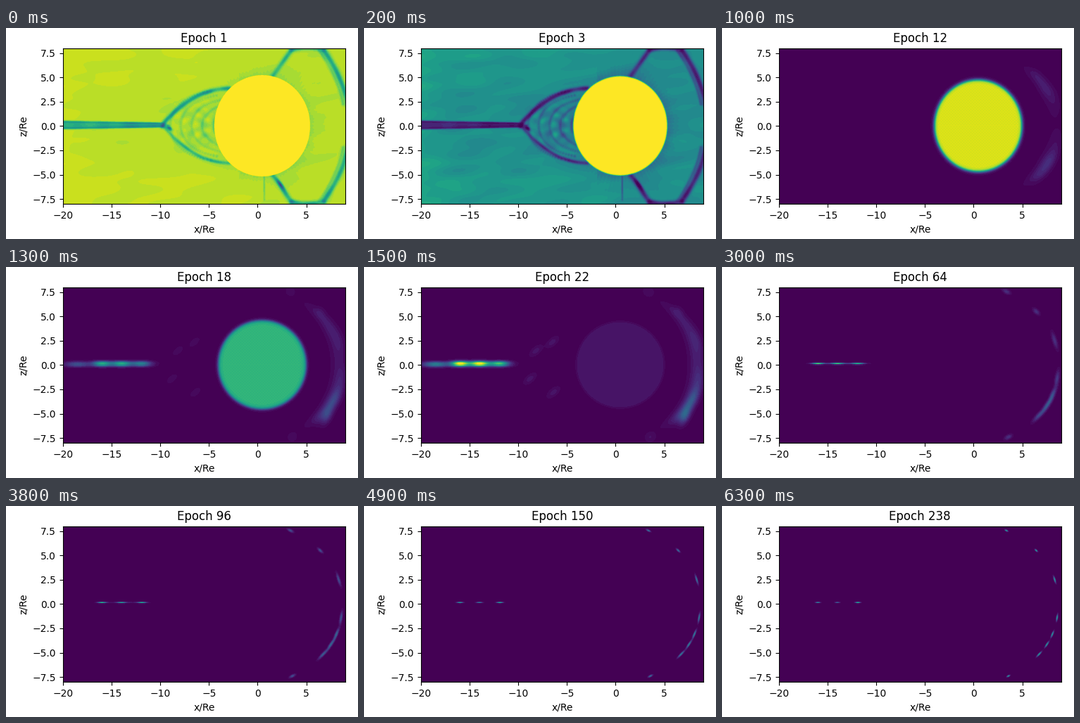
A matplotlib script that plays this animation: 500x300 px, repeating every 6.4 s.

```python
import numpy as np
import matplotlib.pyplot as plt
from matplotlib.animation import FuncAnimation

FRAMES, INTERVAL = 64, 100
WIDTH, HEIGHT, DPI = 500, 300, 100
BANDS = 38  # steps of the filled colour scale
NX, NY = 401, 221

X, Y = np.meshgrid(-20 + (np.arange(NX) + 0.5) * 29 / NX,
                   -8 + (np.arange(NY) + 0.5) * 16 / NY)
rng = np.random.default_rng(4)

# Tail hot spots: x, height when they appear, height at the end
HOT_SPOTS = [(-16, 0.98, 0.55), (-14, 0.8, 0.38), (-11.9, 0.62, 0.8)]
# Heights on the curved front where samples gather
FRONT_Y = [7.5, 5.45, 2.45, -1.4, -3.1, -4.15, -5.15, -7.4]
WISPS = [(-6.5, 2.3), (-8.2, 1.4), (-8.8, -1.4), (-6.4, -2.8)]


def ramp(i, start, end):
    """Linear 0 to 1 between two frames, held outside them."""
    return np.clip((i - start) / (end - start), 0, 1)


def mix(a, b, t):
    return a + (b - a) * t


def decay(i, span):
    """Exponential shrink, 1 at frame 23."""
    return np.exp(-(i - 23) / span)


def waves(count, fx, fy):
    """Smooth random texture of roughly unit size."""
    total = np.zeros_like(X)
    for a, b, phase in rng.uniform(-1, 1, (count, 3)):
        total += np.sin(a * fx * X + b * fy * Y + np.pi * phase)
    return total * np.sqrt(2 / count)


def stroke(xs, ys, width):
    """Soft line through closely spaced points, with uneven strength."""
    nearest = np.full_like(X, 1e9)
    for x, y in zip(xs, ys):
        nearest = np.minimum(nearest, (X - x) ** 2 + (Y - y) ** 2)
    return np.exp(-nearest / width ** 2) * (1 + 0.15 * waves(8, 4, 3))


def spot(x, y, angle, length, width):
    c, s = np.cos(angle), np.sin(angle)
    along = ((X - x) * c + (Y - y) * s) / length
    across = ((Y - y) * c - (X - x) * s) / width
    return np.exp(-0.5 * (along ** 2 + across ** 2))


def disc(rx, ry, soft):
    r = np.hypot((X - 0.39) / rx, Y / ry)
    return 1 / (1 + np.exp(np.clip((r - 1) / soft, -50, 50)))


def front(y):
    return 8.6 - 0.055 * y ** 2 - 0.0007 * y ** 4


def front_angle(y):
    return np.arctan2(1, -0.11 * y - 0.0028 * y ** 3)


def background():
    """Quiet plasma: light towards the left and the outer edges."""
    left = 1 / (1 + np.exp(X))
    outer = np.clip((np.abs(Y) - 3) / 3, 0, 1)
    return (0.892 + 0.025 * np.exp(-(X + 20) / 2) + 0.014 * left * outer
            + 0.007 * waves(20, 1.2, 5))


def halo():
    """Faint rays around the planet."""
    r = np.hypot((X - 0.39) / 4.92, Y / 5.18)
    theta = np.arctan2(Y, X - 0.39)
    rays = 0.8 + 0.2 * np.sin(37 * theta) * np.sin(61 * theta + 3 * r)
    side = np.where(X > -2, 1, 0.5)
    return 0.075 * side * rays * np.exp(-np.maximum(r - 1, 0) / 0.13)


def sheet():
    """Current sheet: a broad band with two darker edges."""
    half = mix(0.3, 0.12, np.clip((X + 20) / 10, 0, 1))
    y = Y - 0.08
    band = 0.26 * np.exp(-(y / (half + 0.1)) ** 4)
    edges = sum(np.exp(-((y - s * half) / 0.1) ** 2) for s in (-1, 1))
    end = 1 / (1 + np.exp((X + 9.8) * 6))
    return (band + 0.14 * edges) * end * (1 + 0.1 * waves(10, 3, 2))


def lobe():
    """Nested field lines between the sheet and the planet."""
    t = np.linspace(0, 1, 70)
    rise = np.sin(np.pi / 2 * t ** 0.85)
    dark = 0.36 * stroke(-9.8 + 6.8 * t, 3.8 * rise, 0.22)
    dark += 0.22 * stroke(-9.6 + 6.6 * t, -3.8 * rise, 0.18)
    angle = np.linspace(-1.2, 1.2, 50)
    for reach in np.linspace(4.6, 9, 5):
        dark += 0.07 * stroke(-reach * np.cos(angle) ** 0.6,
                              0.42 * reach * np.sin(angle), 0.16)
    inside = np.exp(-((X + 6.5) / 2) ** 4 - (Y / 2.2) ** 4)
    dark += 0.025 * inside * (1 + waves(14, 6, 7))
    return dark + 0.5 * spot(-9.1, -0.2, -0.7, 0.22, 0.12)


def shock():
    """Cusps and outer boundary, mirrored above and below the planet."""
    t = np.linspace(0, 1, 60)
    dark = np.zeros_like(X)
    for sign in (-1, 1):
        y = mix(2.2, 7.7, t)
        dark += 0.28 * stroke(9.4 - 0.045 * y ** 2, sign * y, 0.27)
        dark += 0.1 * stroke(8.9 - 0.045 * y ** 2, sign * y, 0.15)
        dark += 0.25 * stroke(mix(1.5, 3.4, t), sign * mix(5.1, 7.8, t), 0.24)
        dark += 0.25 * stroke(mix(3.4, 6.7, t),
                              sign * (7.8 + 0.2 * np.sin(np.pi * t)), 0.25)
    dark += 0.1 * stroke(0.6 + 0 * t, mix(-5.2, -7.6, t), 0.1)
    return dark + 0.5 * spot(2.25, -6, -0.95, 0.45, 0.12)


OPENING = np.clip(background() - halo() - sheet() - lobe() - shock(),
                  0.02, 0.97)
GRID = np.sin(2 * np.pi * X / 0.29) * np.sin(2 * np.pi * Y / 0.29) > 0.3


def planet(i):
    """The disc and its surroundings, which fade out first."""
    shrink = ramp(i, 0, 10)
    body = disc(mix(4.92, 4.5, shrink), mix(5.18, 4.7, shrink)
                - 0.3 * ramp(i, 10, 15), mix(0.003, 0.02, shrink))
    level = 1 - 0.055 * ramp(i, 5, 10)
    level *= mix(1, 0.062, ramp(i, 12, 15)) * (1 - ramp(i, 15, 20))
    rest = OPENING ** ((i + 1) ** 1.3) * (1 - shrink)
    dots = 0.02 * GRID * (body > 0.97) * (shrink - ramp(i, 10, 14))
    return level * body + (1 - body) * rest - dots


def bow(i):
    """Wide band along the front that breaks up into short dashes."""
    shift = X - front(Y) + 0.35
    young = 1 - ramp(i, 10, 15)
    band = np.exp(-(shift / 0.7) ** 2 - (Y / 6) ** 8)
    band *= 1 - young * np.exp(-((np.abs(Y) - 4.3) / 1.4) ** -2)
    fade = ramp(i, 3, 10) * (1 - ramp(i, 15, 22))
    field = 0.085 * fade * band

    length = 0.12 + 0.6 * min(decay(i, 22), 1.1)
    width = 0.05 + 0.21 * min(decay(i, 9), 1.4)
    for y in FRONT_Y:
        early = 0.05 + 0.15 * np.exp(-((y + 3.8) / 1.8) ** 2)
        height = ramp(i, 8, 17) * mix(early, 0.56, ramp(i, 23, 63))
        size = length if abs(y) < 5.3 else 0.5 * length
        field += height * spot(front(y), y, front_angle(y), size, width)
    glow = 0.2 * ramp(i, 10, 15) * (1 - ramp(i, 15, 23))
    return field + glow * spot(7.05, -5.3, 1.1, 0.6, 0.3)


def tail(i):
    """Bright sheet that thins out and splits into three points."""
    rise = ramp(i, 10, 15)
    length = 0.13 + 0.45 * min(decay(i, 14), 1.15)
    width = 0.036 + 0.035 * min(decay(i, 6), 3.8)
    field = np.zeros_like(X)
    for x, first, last in HOT_SPOTS:
        height = rise * mix(first, last, ramp(i, 15, 63))
        field += height * spot(x, 0.1, 0, length, width)
    strand = 0.25 * rise * (1 - ramp(i, 25, 45))
    field += strand * spot(-13.7, 0.1, 0, 1.4, width)
    old = 0.42 * rise * (1 - ramp(i, 15, 26))
    return field + old * spot(-18.5, 0.05, 0, 0.9, width)


def field_at(i):
    field = planet(i) + bow(i) + tail(i)
    wisp = 0.055 * (ramp(i, 11, 15) - ramp(i, 15, 20))
    for x, y in WISPS:
        field += wisp * spot(x, y, 0.7, 0.5, 0.25)
    return np.round(np.clip(field, 0, 1) * BANDS) / BANDS


def epoch_at(i):
    """Ten epochs in steps of one, ten in steps of two, and so on."""
    q, r = divmod(i + 1, 10)
    return 5 * q * (q + 1) + r * (q + 1)


fig = plt.figure(figsize=(WIDTH / DPI, HEIGHT / DPI), dpi=DPI)
ax = fig.add_axes([80.6 / WIDTH, 49.9 / HEIGHT, 401.4 / WIDTH, 221.45 / HEIGHT])
image = ax.imshow(field_at(0), extent=(-20, 9, -8, 8), origin="lower",
                  aspect="auto", interpolation="nearest", cmap="viridis",
                  vmin=0, vmax=1)
ax.set_xticks(np.arange(-20, 6, 5))
ax.set_yticks(np.arange(-7.5, 8, 2.5))
ax.set_xlabel("x/Re")
ax.set_ylabel("z/Re")
title = ax.set_title("Epoch 1")


def update(i):
    image.set_data(field_at(i))
    title.set_text(f"Epoch {epoch_at(i)}")
    return image, title


anim = FuncAnimation(fig, update, frames=FRAMES, interval=INTERVAL,
                     repeat=True, repeat_delay=0, blit=False)
plt.show()
```
